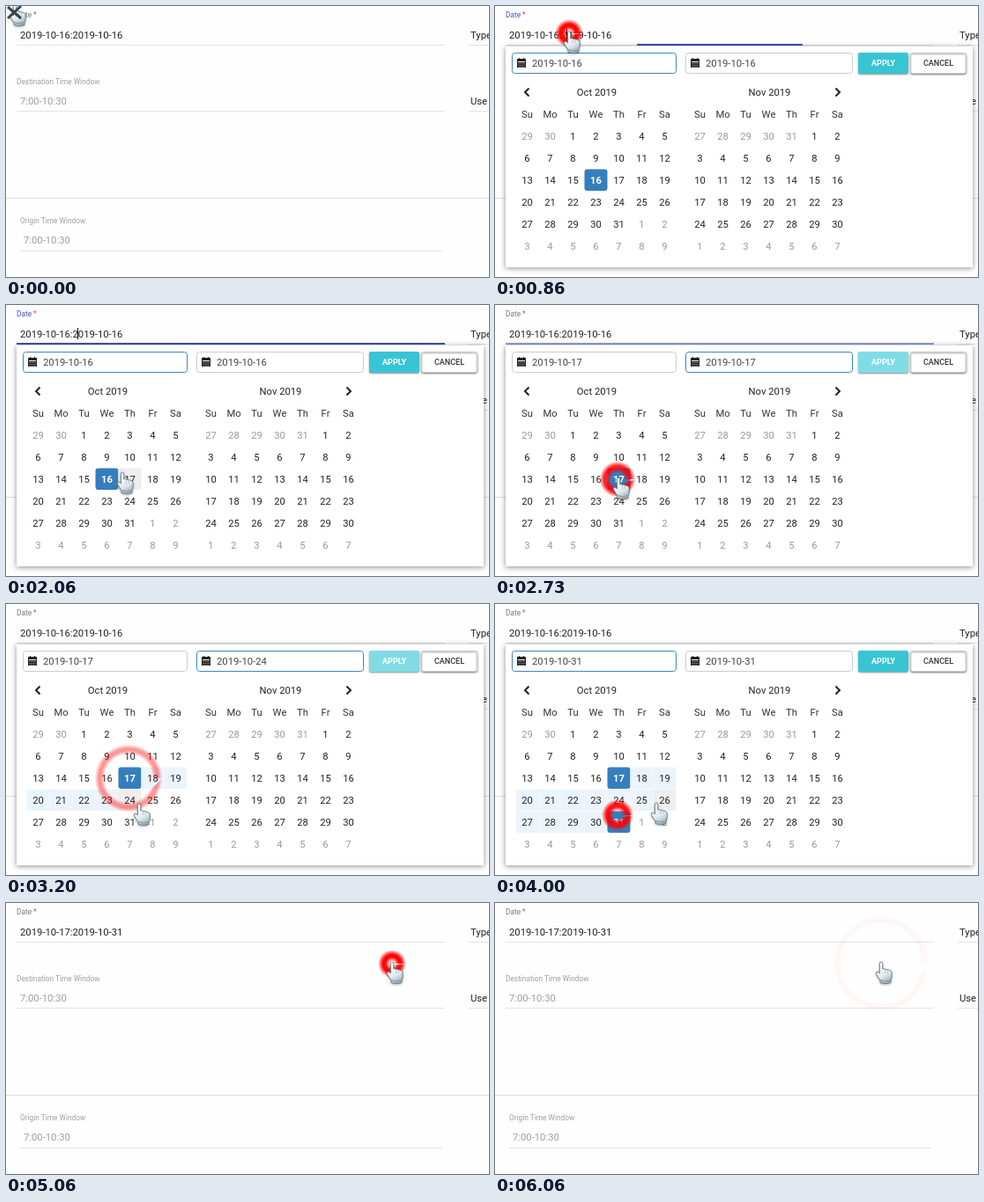
An HTML page with a canvas that plays this animation: 548x308 px, repeating every 6400 ms.

```html
<!DOCTYPE html>
<html lang="en">
<head>
<meta charset="utf-8">
<title>Date range picker</title>
<style>
html, body { margin: 0; width: 100%; height: 100%; overflow: hidden; background: #fefefe; }
canvas { display: block; }
</style>
</head>
<body>
<canvas id="stage" width="548" height="308"></canvas>
<script>
const g = document.getElementById('stage').getContext('2d');
const LOOP = 6400, FPS = 15, LAST_STEP = 91;
const OPEN = 850, PICK_START = 2590, PICK_END = 3920, APPLY = 5040;
const BLUE = '#357ebd', INK = '#3f51b5';
const clamp = v => Math.max(0, Math.min(1, v));

// Pointer path: time, x, y
const path = [
  [60, 44, 9], [260, 44, 9], [600, 80, 28], [730, 84, 31], [930, 84, 31],
  [1467, 141, 109], [1534, 142, 126], [2067, 132, 192], [2200, 140, 198], [2800, 140, 198],
  [3200, 151, 229], [3334, 147, 234], [3600, 139, 240], [3934, 139, 240], [4000, 183, 228],
  [4200, 477, 75], [4334, 460, 70], [4500, 438, 69], [LOOP, 438, 69]
];
// Click ripples: start, x, y
const ripples = [[840, 84, 31], [2590, 139, 198], [3920, 139, 240], [5040, 438, 69]];

function pointerAt(t) {
  if (t < 60) return [10, 0];
  const i = path.findIndex(k => k[0] > t), a = path[Math.max(0, i - 1)], b = path[i];
  const k = b === a ? 0 : (t - a[0]) / (b[0] - a[0]);
  return [a[1] + (b[1] - a[1]) * k, a[2] + (b[2] - a[2]) * k];
}

function text(s, x, cy, color = '#222', size = 11.25, weight = 400, align = 'left') {
  g.font = `${weight} ${size}px Roboto, sans-serif`;
  g.textAlign = align;
  g.fillStyle = color;
  g.fillText(s, x, cy + size * 0.355);
}

function rect(x, y, w, h, color) {
  g.fillStyle = color;
  g.fillRect(x, y, w, h);
}

function box(x, y, w, h, r, fill, stroke) {
  g.beginPath();
  g.roundRect(x, y, w, h, r);
  g.fillStyle = fill;
  g.fill();
  if (stroke) {
    g.strokeStyle = stroke;
    g.lineWidth = 1;
    g.stroke();
  }
}

function shadowed(blur, draw) {
  g.save();
  g.shadowColor = 'rgba(0,0,0,.45)';
  g.shadowBlur = blur;
  g.shadowOffsetY = 1;
  draw();
  g.restore();
}

function polyline(color, width, ...points) {
  g.beginPath();
  points.forEach(p => g.lineTo(...p));
  g.strokeStyle = color;
  g.lineWidth = width;
  g.stroke();
}

function form(t) {
  const focused = t >= OPEN && t < PICK_START;
  rect(0, 0, 548, 308, '#fefefe');
  text('Date', 12, 10, focused ? INK : '#757575', 8.3);
  text('*', 31, 10, focused ? '#f44336' : '#757575', 8.3);
  text(t < APPLY ? '2019-10-16:2019-10-16' : '2019-10-17:2019-10-31', 16, 33);
  text('Type', 527, 33);
  text('Destination Time Window', 12, 86.5, '#9e9e9e', 8.3);
  text('7:00-10:30', 16, 108, '#9e9e9e');
  text('Use', 527, 108);
  text('Origin Time Window', 16, 244, '#9e9e9e', 8.3);
  text('7:00-10:30', 20, 266, '#9e9e9e');
  for (const y of [44, 119]) {
    rect(12, y, 486, 1, '#e3e3e3');
    rect(525, y, 23, 1, '#e3e3e3');
  }
  rect(0, 218, 548, 1, '#dcdcdc');
  rect(16, 278, 479, 1, '#e3e3e3');

  if (t >= OPEN && t < PICK_START + 300) {
    const grow = 1 - (1 - clamp((t - OPEN + 70) / 400)) ** 2;
    g.globalAlpha = 1 - clamp((t - PICK_START) / 300);
    rect(255 - 243 * grow, 43, 486 * grow, 2, INK);
    g.globalAlpha = 1;
  }
  if (focused && Math.floor((t - OPEN) / 500) % 2 === 0) rect(81, 26, 1, 13, '#111');
}

function dateField(x, w, value, active) {
  box(x + .5, 53.5, w - 1, 23, 3, '#fff', active ? '#3a87c4' : '#ccc');
  const ix = x + 6;
  rect(ix, 60, 10, 10, '#222');
  rect(ix + 2, 59, 1, 2, '#222');
  rect(ix + 7, 59, 1, 2, '#222');
  rect(ix + 1, 63, 8, 1, '#fff');
  for (let i = 0; i < 3; i++) rect(ix + 1, 65 + i * 2, 8, .5, '#aaa');
  text(value, x + 23, 65, '#444');
}

function month(title, x, offset, length, before, look) {
  text(title, x + 79, 98, '#222', 11.25, 400, 'center');
  ['Su', 'Mo', 'Tu', 'We', 'Th', 'Fr', 'Sa'].forEach((d, i) =>
    text(d, x + i * 26, 123, '#333', 11.25, 400, 'center'));
  for (let i = 0; i < 42; i++) {
    const n = i - offset, off = n < 1 || n > length;
    const cx = x + i % 7 * 26, cy = 148 + Math.floor(i / 7) * 25;
    const day = n < 1 ? n + before : n > length ? n - length : n;
    const [fill, active] = look(n, i);
    if (fill) box(cx - 13, cy - 12.5, 26, 24.5, active ? 3 : 0, fill);
    text(day, cx, cy, active ? '#fff' : off ? '#999' : '#222', 11.25, active ? 700 : 400, 'center');
  }
}

let lastHover = 17;

function picker(t, [px, py]) {
  const col = Math.floor((px - 23) / 26), row = Math.floor((py - 135.5) / 25);
  const hover = col >= 0 && col < 7 && row >= 0 && row < 6 ? row * 7 + col : -1;
  const picking = t >= PICK_START && t < PICK_END;
  const first = t < PICK_START ? 16 : 17;
  if (!picking) lastHover = 17;
  else if (hover >= 0) lastHover = Math.max(17, hover - 1);
  const last = t < PICK_START ? 16 : picking ? lastHover : 31;
  const startText = t < PICK_START ? 16 : picking ? 17 : 31;

  shadowed(6, () => rect(12, 46, 530, 251, '#fff'));
  dateField(19, 187, '2019-10-' + startText, !picking);
  dateField(216, 190, '2019-10-' + last, picking);
  shadowed(2, () => box(412, 53, 57, 24, 2, picking ? '#80dce4' : '#38c5d3'));
  text('APPLY', 440.5, 65, '#fff', 9, 700, 'center');
  shadowed(2, () => box(471.5, 53.5, 63, 23, 2, '#fff', '#ccc'));
  text('CANCEL', 503, 65, '#333', 9, 500, 'center');
  polyline('#222', 2, [38.5, 93.5], [34, 98], [38.5, 102.5]);
  polyline('#222', 2, [386.5, 93.5], [391, 98], [386.5, 102.5]);

  month('Oct 2019', 36.5, 1, 31, 30, (n, i) => {
    if (n === first || n === last && !picking) return [BLUE, true];
    if (i === hover) return ['#eee'];
    return [n > first && n <= last ? '#ecf4fb' : null];
  });
  month('Nov 2019', 232.5, 4, 30, 31, () => []);
}

function ripple(t, [start, x, y]) {
  const p = (t - start) / 1040;
  if (p < 0 || p > 1) return;
  const r = 8 + 42 * p, half = 7 - 2 * p;
  const ring = g.createRadialGradient(x, y, r - half, x, y, r + half);
  [[0, 0], [.38, 1], [.62, 1], [1, 0]].forEach(([stop, a]) =>
    ring.addColorStop(stop, `rgba(255,0,0,${a * Math.max(.03, 1 - p)})`));
  g.fillStyle = ring;
  g.beginPath();
  g.arc(x, y, r + half, 0, 7);
  g.arc(x, y, r - half, 0, 7, true);
  g.fill();
}

const hand = new Path2D('M-1.6 0Q-1.6-2 0-2T1.8 0V6Q3.2 5 4.6 6.4Q6 5.6 7.4 7.1Q9 6.4 10.2 8' +
  'Q12 7.8 12.2 10V14Q12 17 11 18.5V21.5Q5 23.5-1 21.5V18.5Q-4 15-5.6 11.5Q-6 9-4 9Q-2.6 9.3-1.6 11Z');

function pointer(x, y) {
  g.save();
  g.translate(x, y);
  const shade = g.createLinearGradient(-4, 2, 8, 22);
  shade.addColorStop(0, '#fff');
  shade.addColorStop(.6, '#dfe9ed');
  shade.addColorStop(1, '#94adb8');
  g.fillStyle = shade;
  shadowed(3, () => g.fill(hand));
  g.strokeStyle = '#6d7c84';
  g.lineWidth = .9;
  g.stroke(hand);
  polyline('#a9b8bf', .7, [4.6, 7], [4.6, 11]);
  polyline('#a9b8bf', .7, [7.4, 7.6], [7.4, 11]);
  polyline('#7f98a3', 1.2, [-.5, 18.7], [5, 20], [10.6, 18.7]);
  g.restore();
}

function draw(time) {
  const step = Math.min(LAST_STEP, Math.floor((time + 7) * FPS / 1000));
  const t = step * 1000 / FPS + .01;
  const at = pointerAt(t);
  form(t);
  if (t >= OPEN && t < APPLY) picker(t, at);
  ripples.forEach(r => ripple(t, r));
  pointer(...at);
  if (t < 60) {
    polyline('#39434b', 3, [2, 1], [17, 14]);
    polyline('#39434b', 3, [17, 0], [2, 14]);
  }
}

const began = performance.now();
function tick() {
  draw((performance.now() - began) % LOOP);
  requestAnimationFrame(tick);
}
tick();
</script>
</body>
</html>
```
